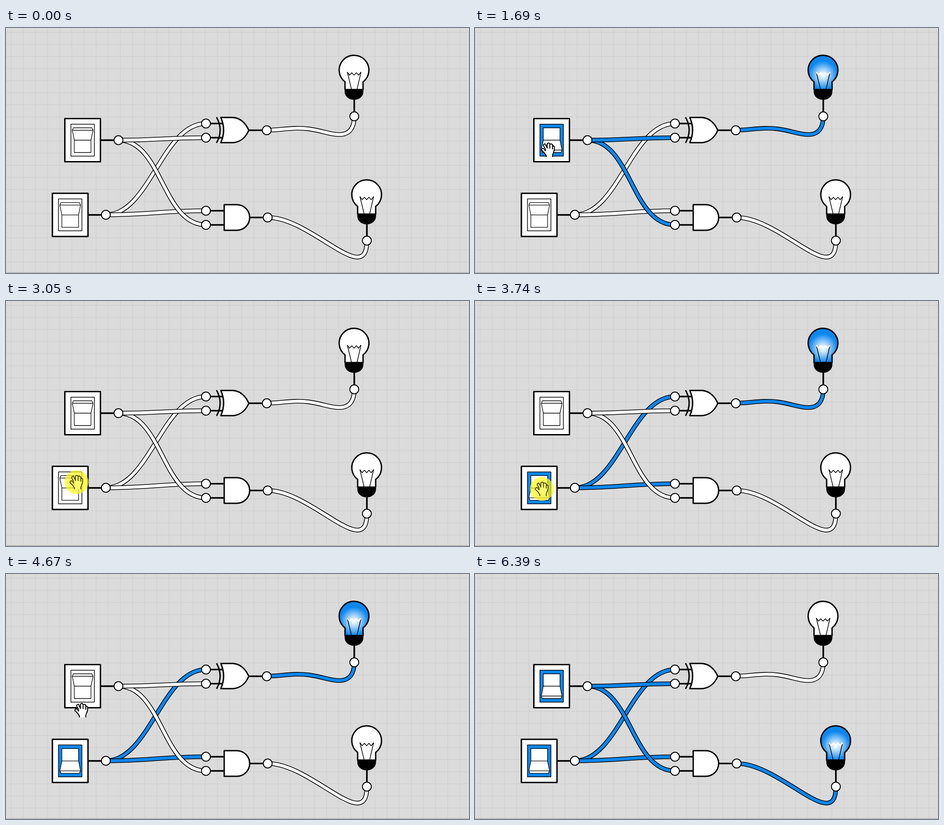
An HTML page that plays this animation: 1027x545 px, repeating every 7.65 s.

```html
<!DOCTYPE html>
<html lang="en">
<head>
<meta charset="utf-8">
<title>Half adder</title>
<style>
  html, body { margin: 0; width: 100%; height: 100%; overflow: hidden; background: #dbdbdb; }
  svg { display: block; width: 100vw; height: 100vh; }
</style>
</head>
<body>
<svg id="stage" viewBox="0 0 1027 545" fill="none" stroke="#000" stroke-linejoin="round">
  <defs>
    <radialGradient id="glow" gradientUnits="userSpaceOnUse" cx="0" cy="11" r="37">
      <stop offset="0" stop-color="#fff"/>
      <stop offset=".2" stop-color="#d3e9fd"/>
      <stop offset=".85" stop-color="#0d87ee"/>
    </radialGradient>
  </defs>
</svg>
<script>
const LOOP = 7650, STEP = 78, GRID = 26.9, REACH = 97;
const BLUE = '#0d87ee', WHITE = '#fff';
const stage = document.getElementById('stage');

function add(parent, tag, attrs) {
  const el = document.createElementNS('http://www.w3.org/2000/svg', tag);
  set(el, attrs);
  parent.appendChild(el);
  return el;
}
function set(el, attrs) {
  for (const k in attrs) el.setAttribute(k, attrs[k]);
}
const path = (parent, d, width, fill = 'none') =>
  add(parent, 'path', { d, 'stroke-width': width, fill });
const group = (x, y) => add(stage, 'g', { transform: `translate(${x} ${y})` });

function drawGrid() {
  let d = '';
  for (let x = 11.5; x < 1027; x += GRID) d += `M${x} 0V545`;
  for (let y = 9.5; y < 540; y += GRID) d += `M0 ${y}H1027`;
  set(path(stage, d, 1), { stroke: '#cdcdcd' });
  set(path(stage, 'M0 544.3H1027', 1.4), { stroke: '#b0b0b0' });
}

function wire(d) {
  path(stage, d, 10);
  return path(stage, d, 6.8);
}
// Cable that leaves and arrives level
const link = ([x1, y1], [x2, y2]) =>
  wire(`M${x1} ${y1}C${x1 + REACH} ${y1} ${x2 - REACH} ${y2} ${x2} ${y2}`);

function makeSwitch(x, y) {
  const g = group(x, y);
  path(g, 'M39 0H70', 3.6);
  path(g, 'M-39.5 -48H39.5V48H-39.5Z', 3.1, WHITE);
  const panel = path(g, 'M-26 -35.5H26V35.5H-26Z', 1.5);
  const rocker = path(g, 'M-18.5 0V-27.5H18.5V0L23 22L20.5 27.5H-20.5L-23 22ZH18.5M-23 22H23', 1.3, WHITE);
  return on => {
    set(panel, { fill: on ? BLUE : WHITE });
    set(rocker, { transform: on ? '' : 'scale(1 -1)' });
  };
}

function makeBulb(x, y) {
  const g = group(x, y);
  path(g, 'M.5 64V94', 3.6);
  const glass = path(g, 'M-20 43V26A33 33 0 1 1 20 26V43Z', 3);
  path(g, 'M-20 43H20V47C20 58 11 65 0 65S-20 58 -20 47Z', 1.6, '#000');
  path(g, 'M-5.5 43L-15 4M6.5 43L15.5 4', 1.5);
  const coil = path(g, 'M-15 4L-10 11L-5 5.5L0 11L5 5.5L10 11L15.5 4', 1.5);
  return on => {
    set(glass, { fill: on ? 'url(#glow)' : WHITE });
    set(coil, { stroke: on ? WHITE : '#000', 'stroke-width': on ? 3 : 1.5 });
  };
}

// Sockets
const upperOut = [249.5, 249.5], lowerOut = [221.5, 415.5];
const xorTop = [443.5, 212.5], xorLow = [443.5, 244], xorOut = [578.5, 227.5];
const andTop = [443.5, 406.5], andLow = [443.5, 438], andOut = [580.5, 421.5];
const sumIn = [772.5, 196.5], carryIn = [800.5, 473];

drawGrid();
const lowerWires = [link(lowerOut, xorTop), link(lowerOut, andTop)];
const upperWires = [link(upperOut, andLow), link(upperOut, xorLow)];
const sumWire = wire(`M${xorOut}C610 227 640 220 672 224.5S718 237 740 237C762 237 772.5 222 ${sumIn}`);
const carryWire = wire(`M${andOut}C${andOut[0] + REACH} ${andOut[1]} ${carryIn[0]} ${carryIn[1] + 106} ${carryIn}`);

const upper = makeSwitch(170, 249.5), lower = makeSwitch(142.4, 415.8);
const sumBulb = makeBulb(772, 94), carryBulb = makeBulb(800, 371);

// XOR gate
path(stage, 'M453 212.5H482M453 244H482M538 227.5H569', 3.6);
path(stage, 'M467 198.5Q483 227 467 255.5', 3);
path(stage, 'M476.5 199H503C520 200 532 212 538.5 227.5C532 243 520 254 503 255H476.5Q489 227 476.5 199Z', 3, WHITE);
// AND gate
path(stage, 'M453 406.5H485M453 438H485M540 421.5H571', 3.6);
path(stage, 'M484 393H512A28.5 28.5 0 0 1 512 450H484Z', 3, WHITE);

for (const [cx, cy] of [upperOut, lowerOut, xorTop, xorLow, xorOut, andTop, andLow, andOut, sumIn, carryIn])
  add(stage, 'circle', { cx, cy, r: 9.9, fill: WHITE, 'stroke-width': 2 });

const pointer = add(stage, 'g', {});
const halo = add(pointer, 'circle', { cx: 15.5, cy: 16, r: 26.5, fill: '#fff51a', 'fill-opacity': .7, stroke: 'none' });
const hand = path(pointer,
  'M5.5 16V14.5L3.5 11.5L.5 8.5V7.5L1.5 6.5H2.5L4.5 9V7L2.5 3.5V2.5L3.5 1.5H4.5L6.5 6V1.5L7.5 .5H8.5' +
  'L9.5 1.5V6V2L10.5 1.5H11.5L12.5 2.5V7V4.5L13.5 3.5L14.5 4.5V8L13.5 11L12.5 13.5V16', 1);
set(hand, { transform: 'scale(2)', 'shape-rendering': 'crispEdges' });

// The pointer travels to x, y between two times, then rests there
const moves = [
  { from: 0, to: 0, x: 560, y: 499 },
  { from: 510, to: 510, x: 232, y: 468 },
  { from: 510, to: 740, x: 238, y: 363 },
  { from: 740, to: 980, x: 168, y: 274 },
  { from: 1140, to: 1290, x: 147, y: 255 },
  { from: 2420, to: 2810, x: 93, y: 448 },
  { from: 2810, to: 3050, x: 141, y: 387 },
  { from: 3190, to: 3360, x: 133, y: 402 },
  { from: 4350, to: 4670, x: 152, y: 287 },
  { from: 4670, to: 4910, x: 154, y: 248 },
  { from: 6180, to: 6340, x: 545, y: 478 }
];
// Press and release times; a switch flips on release
const upperClicks = [[1540, 1690], [2260, 2330], [4910, 5080]];
const lowerClicks = [[3050, 3190], [3740, 3830], [4200, 4350]];

const between = (t, a, b) => t >= a && t < b;
const flipped = (clicks, t) => clicks.filter(c => t >= c[1]).length % 2 === 1;

function pointerAt(t) {
  let x = 0, y = 0;
  for (const m of moves) {
    if (t < m.from) break;
    const steps = Math.round((m.to - m.from) / STEP);
    const p = t >= m.to ? 1 : Math.floor((t - m.from) / (m.to - m.from) * steps) / steps;
    x += (m.x - x) * p;
    y += (m.y - y) * p;
  }
  return [x, y];
}

function render(t) {
  const a = flipped(upperClicks, t), b = flipped(lowerClicks, t);
  const sum = a !== b, carry = a && b;
  const paint = (on, ...wires) => wires.forEach(w => set(w, { stroke: on ? BLUE : WHITE }));
  paint(a, ...upperWires);
  paint(b, ...lowerWires);
  paint(sum, sumWire);
  paint(carry, carryWire);
  upper(a);
  lower(b);
  sumBulb(sum);
  carryBulb(carry);

  const down = [...upperClicks, ...lowerClicks].some(c => between(t, ...c));
  const shown = between(t, 200, 280) || between(t, 510, 6390);
  set(pointer, { display: shown ? 'inline' : 'none', transform: `translate(${pointerAt(t)})` });
  set(halo, { display: down ? 'inline' : 'none' });
  set(hand, { fill: down ? '#fff96a' : WHITE, stroke: down ? '#55520c' : '#000' });
}

const start = performance.now();
function tick() {
  render((performance.now() - start) % LOOP);
  requestAnimationFrame(tick);
}
render(0);
requestAnimationFrame(tick);
</script>
</body>
</html>
```
